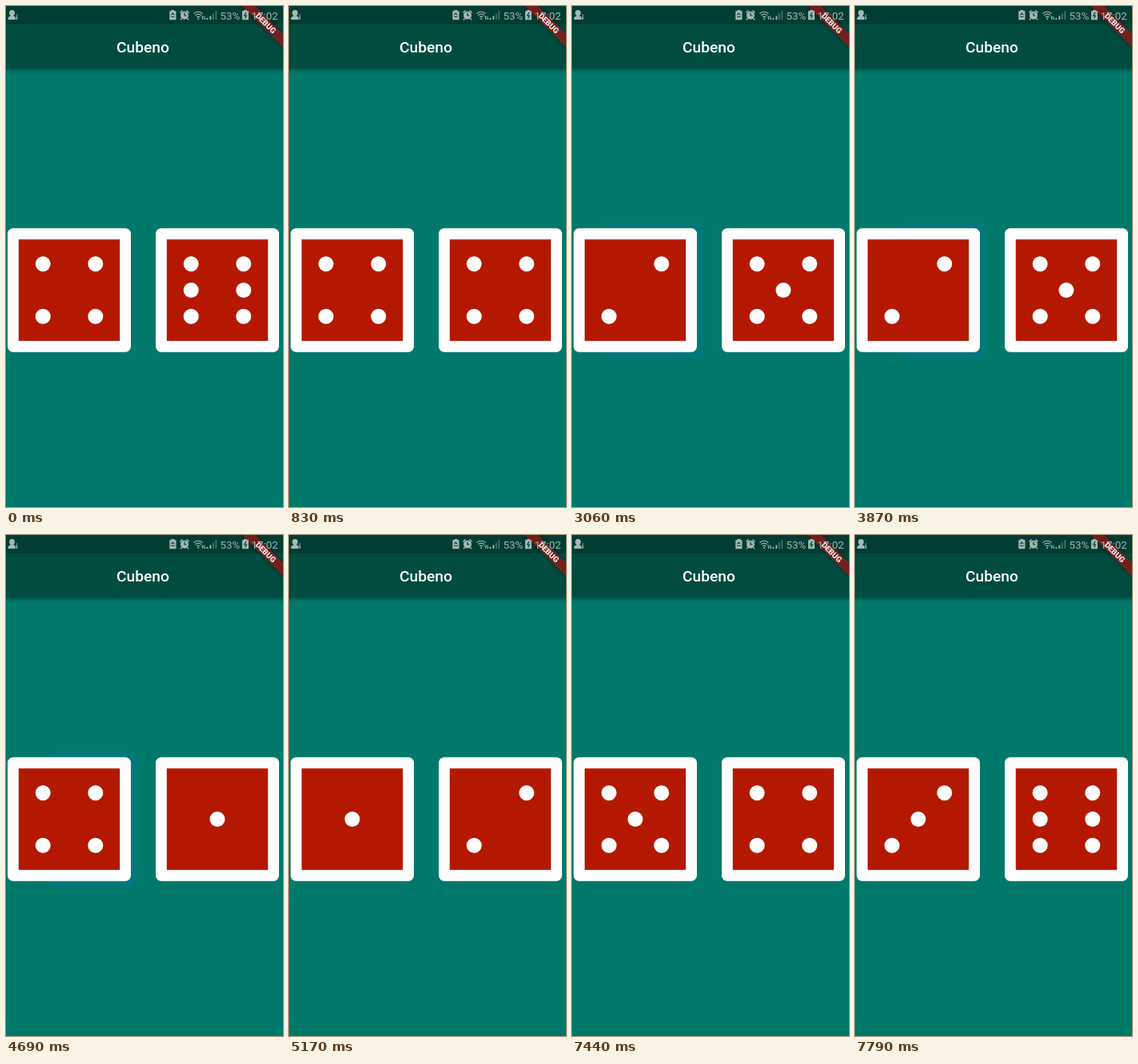
These frames come from a looping animation (346 by 625 pixels, 7.99 s). An HTML page:

```html
<!DOCTYPE html>
<html lang="pt">
<head>
<meta charset="utf-8">
<title>Cubeno</title>
<style>
  html, body { margin: 0; width: 100%; height: 100%; overflow: hidden; background: #00796b; }
  svg { display: block; width: 100vw; height: 100vh; }
  text { font-family: Roboto, "Noto Sans", sans-serif; }
</style>
</head>
<body>
<svg viewBox="0 0 346 625">
  <defs>
    <linearGradient id="shade" x1="0" y1="0" x2="0" y2="1">
      <stop offset="0" stop-opacity=".32"/>
      <stop offset=".45" stop-opacity=".11"/>
      <stop offset="1" stop-opacity="0"/>
    </linearGradient>
    <filter id="blur" x="-20%" y="-80%" width="140%" height="260%">
      <feGaussianBlur stdDeviation="2.4"/>
    </filter>
    <clipPath id="inkLeft"><rect x="-6" y="270" width="170" height="169.5" rx="2"/></clipPath>
    <clipPath id="inkRight"><rect x="179" y="270" width="170" height="169.5" rx="2"/></clipPath>
  </defs>

  <rect width="346" height="625" fill="#00796b"/>

  <g fill="#007896">
    <g clip-path="url(#inkLeft)"><circle id="rippleLeft" cx="108" cy="354.5"/></g>
    <g clip-path="url(#inkRight)"><circle id="rippleRight" cx="259" cy="358"/></g>
  </g>
  <g id="dice"></g>

  <!-- app bar -->
  <rect y="78" width="346" height="7" fill="url(#shade)"/>
  <rect width="346" height="78" fill="#004d40"/>
  <rect width="346" height="23" fill="#003d33"/>
  <text x="171" y="57.5" font-size="19.2" font-weight="500" text-anchor="middle" fill="#fff">Cubeno</text>

  <!-- corner ribbon -->
  <g transform="translate(324.5 21.5) rotate(45)">
    <rect x="-38.5" y="-5.8" width="77" height="11.6" opacity=".5" filter="url(#blur)"/>
    <rect x="-38.5" y="-5.8" width="77" height="11.6" fill="#b71c1c" fill-opacity=".63"/>
    <text y="3.5" font-size="9.8" font-weight="900" text-anchor="middle" fill="#f4eeee">DEBUG</text>
  </g>

  <!-- status bar -->
  <g fill="#a5b8b4">
    <circle cx="7.5" cy="8.5" r="3.5"/>
    <path d="M2.5 17v-2q0-1.5 3-2.5v-2h4v2q2 .6 2.3 1.5V17zM12.7 12.5h1.5V17h-1.5zM12.7 10.5h1.5v1.2h-1.5z"/>
    <path d="M206.6 5h3.6v1.3h2.3v11h-8.2v-11h2.3z"/>
    <circle cx="223" cy="11.7" r="5"/>
    <path d="M217.5 8.5l3-3M228.500 8.5l-3-3M219.500 15.500l-1.500 1.700M226.500 15.500l1.500 1.700" stroke="#a5b8b4" stroke-width="1.6"/>
    <path d="M250.500 15h1.800v2h-1.800zM254.500 12.500h1.800V17h-1.800z"/>
    <path d="M258 9.500h1.700V17H258zM261.500 6h1.700v11h-1.700z" opacity=".45"/>
    <path d="M297.200 5h3.600v1.300h2.200v11h-8v-11h2.200z"/>
    <text x="267.500" y="16.500" font-size="13.400">53%</text>
    <text x="306.500" y="16.500" font-size="13.400">17:02</text>
  </g>
  <g fill="none" stroke="#003d33" stroke-width="1.200">
    <path d="M223 8.500v3.500h2.500M206.300 11.500l2-2.500 2 2.500M206.200 13.500h4.400M300 8l-2.300 4h2.700L298.500 15.500"/>
  </g>
  <g fill="none" stroke="#a5b8b4" stroke-width="1.200">
    <path d="M234.500 9.500q5.500-4.500 11 0M236.300 11.700q4-3.200 7.700 0M238.200 13.900q2-1.700 4 0"/>
    <path d="M245.500 17v-4M244.200 14.300l1.300-1.500 1.300 1.500M248 12.500v4M246.800 15.300l1.200 1.500 1.200-1.500" stroke-width=".9"/>
  </g>
  <circle cx="240.200" cy="16" r="1.100" fill="#a5b8b4"/>
</svg>

<script>
const LOOP = 7990;
const SVG_NS = "http://www.w3.org/2000/svg";
const FIRST_ROLL = [4, 6];

// Each tap: start, end, number of drawn steps, resulting faces
const taps = [
  { from: 500, to: 830, steps: 6, roll: [4, 4] },
  { from: 1430, to: 1780, steps: 5, roll: [2, 1] },
  { from: 2190, to: 2460, steps: 5, roll: [3, 1] },
  { from: 2990, to: 3330, steps: 6, roll: [2, 5] },
  { from: 3870, to: 4210, steps: 6, roll: [4, 1] },
  { from: 4690, to: 5170, steps: 7, roll: [1, 2] },
  { from: 5690, to: 6040, steps: 6, roll: [5, 4] },
  { from: 7440, to: 7790, steps: 6, roll: [3, 6], right: true }
];

// Pip column, row and the rule that shows it for a face
const pips = [
  [0, 0, n => n % 2 === 1],
  [1, -1, n => n > 1],
  [-1, 1, n => n > 1],
  [-1, -1, n => n > 3],
  [1, 1, n => n > 3],
  [-1, 0, n => n === 6],
  [1, 0, n => n === 6]
];

function add(parent, tag, attrs) {
  const node = document.createElementNS(SVG_NS, tag);
  for (const key in attrs) node.setAttribute(key, attrs[key]);
  return parent.appendChild(node);
}

function makeDie(cx) {
  const die = add(document.getElementById("dice"), "g", { transform: `translate(${cx} 354.5)` });
  add(die, "rect", { x: -77, y: -77.3, width: 154, height: 154.6, rx: 7, fill: "#fff" });
  add(die, "rect", { x: -63.2, y: -63.3, width: 126.4, height: 126.6, fill: "#b51800" });
  const dots = pips.map(([col, row]) =>
    add(die, "circle", { cx: col * 32.8, cy: row * 32.8, r: 9.5, fill: "#fff" }));
  return face => dots.forEach((dot, i) =>
    dot.setAttribute("visibility", pips[i][2](face) ? "visible" : "hidden"));
}

const showFace = [makeDie(79), makeDie(264)];
const rippleLeft = document.getElementById("rippleLeft");
const rippleRight = document.getElementById("rippleRight");

function setRipple(circle, radius, opacity) {
  circle.setAttribute("r", radius);
  circle.setAttribute("opacity", opacity);
}

function draw(t) {
  let roll = FIRST_ROLL;
  setRipple(rippleLeft, 0, 0);
  setRipple(rippleRight, 0, 0);

  for (const tap of taps) {
    if (t < tap.from) break;
    const last = tap.steps - 1;
    const step = Math.min(last, Math.floor((t - tap.from) / (tap.to - tap.from) * last + 1e-6));
    if (step > 0) roll = tap.roll;
    if (step === last) continue;
    const p = step / last;
    const opacity = 0.4 * (1 - p * p);
    if (tap.right) setRipple(rippleRight, 62 + 26 * p, opacity);
    else setRipple(rippleLeft, 95 + 50 * p, opacity);
  }
  showFace.forEach((show, i) => show(roll[i]));
}

const start = performance.now();
function tick() {
  draw((performance.now() - start) % LOOP);
  requestAnimationFrame(tick);
}
tick();
</script>
</body>
</html>
```
